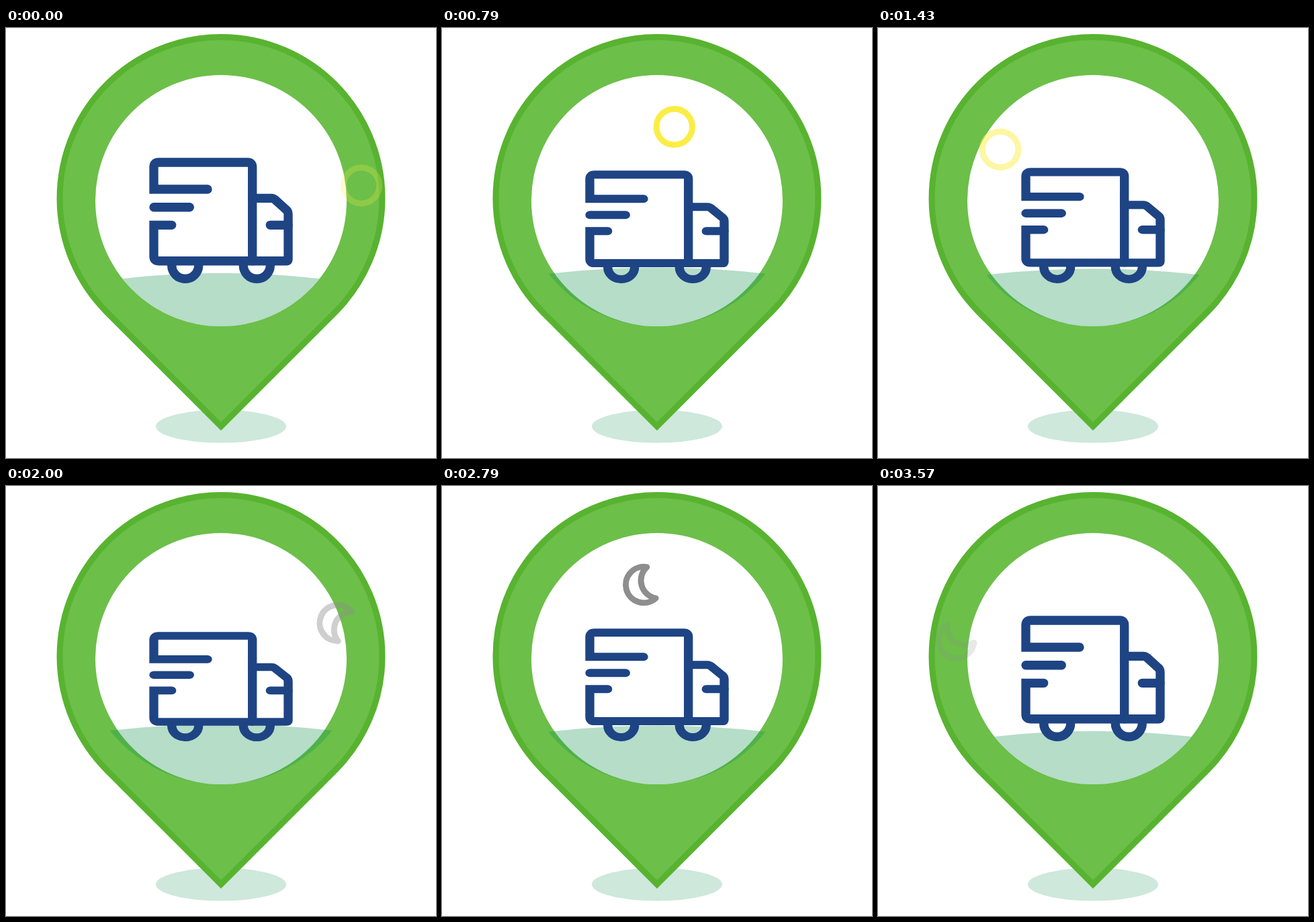
An HTML page for the animation above (3710 ms loop, 640x640 px).

```html
<!DOCTYPE html>
<html lang="en">
<head>
<meta charset="utf-8">
<title>Delivery pin</title>
<style>
  html, body { margin: 0; width: 100%; height: 100%; overflow: hidden; background: #fff; }
  svg { display: block; width: 100%; height: 100%; }
  .line { fill: none; stroke-width: 8.9; stroke-linejoin: round; }
</style>
</head>
<body>
<svg viewBox="0 0 640 640">
  <ellipse cx="320" cy="593" rx="97" ry="24.5" fill="#0c8e4b" fill-opacity=".2"/>
  <path d="M150.3 423.2A240 240 0 1 1 489.7 423.2L320 592.9Z" fill="#6cbf49" stroke="#58b330" stroke-width="9"/>
  <circle cx="320" cy="257" r="187" fill="#fff"/>
  <path id="ground" d="M173.4 373Q320 356.3 466.6 373A187 187 0 0 1 173.4 373Z" fill="#0c8e4b" fill-opacity=".3"/>
  <g id="truck" fill="none" stroke="#1e4484" stroke-width="13.35" stroke-linecap="round">
    <path d="M300 240H220V207Q220 200 227 200H360Q366.7 200 366.7 207V346.7"/>
    <path d="M220 266.7H273.3M393.3 293.3H420"/>
    <path d="M246.7 293.3H220V340Q220 346.7 227 346.7H418Q420 346.7 420 344.7V277Q420 273 417 270.5L400.5 255.5Q398 253.3 395 253.3H366.7"/>
    <path d="M246.7 353.3a20 20 0 0 0 40 0M353.3 353.3a20 20 0 0 0 40 0"/>
  </g>
  <circle id="sun" class="line" cx="320" cy="146" r="26.7" stroke="#fbed46"/>
  <path id="moon" class="line" d="M308 120.5A26.8 26.8 0 1 0 320.8 167A26.9 26.9 0 0 1 308 120.5Z" stroke="#8e8e8e"/>
</svg>
<script>
const LOOP = 3710, FPS = 14, STEPS = 50, HALF = STEPS / 2;
const [ground, truck, sun, moon] = ['ground', 'truck', 'sun', 'moon'].map(id => document.getElementById(id));

// Scale around a point on the vertical axis of the pin.
const scale = (el, sx, sy, y) =>
  el.setAttribute('transform', `translate(320 ${y}) scale(${sx} ${sy}) translate(-320 ${-y})`);

// Swing around the centre of the sky arc.
function swing(el, angle, opacity) {
  el.setAttribute('transform', `rotate(${angle} 320 437)`);
  el.setAttribute('opacity', Math.max(0, Math.min(1, opacity)));
}

// Three linear bounces, the middle one deeper.
function squash(step) {
  const phase = step / STEPS * 3;
  const depth = Math.floor(phase) === 1 ? 0.2 : 0.15;
  return depth * (1 - Math.abs(1 - 2 * (phase % 1)));
}

function draw(now) {
  // Motion advances in steps and rests on the last pose.
  const step = Math.min(STEPS, Math.floor((now % LOOP + 5) * FPS / 1000));
  const s = squash(step), night = step - HALF;
  scale(truck, 1, 1 - s, 380);
  scale(ground, 1 + s, 1 + s, 443.8);
  swing(sun, 45.9 - 3.71 * step, Math.min(0.24 + 0.085 * step, -0.1 * night));
  swing(moon, 51.1 - 3.69 * night, Math.min(0.14 * night, 0.2 + 0.08 * (HALF - night)));
}

const start = performance.now();
function tick() {
  draw(performance.now() - start);
  requestAnimationFrame(tick);
}
tick();
</script>
</body>
</html>
```
